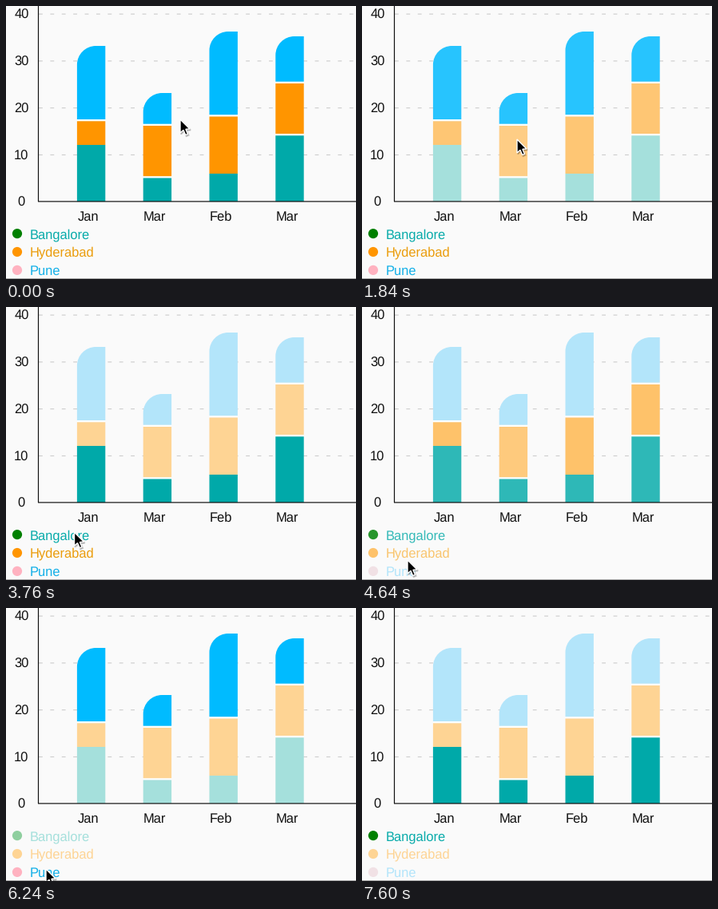
A matplotlib script for the animation above (7.68 s loop, 438 by 342 pixels).

```python
import numpy as np
import matplotlib.pyplot as plt
from matplotlib.animation import FuncAnimation
from matplotlib.colors import to_rgb
from matplotlib.patches import Circle, PathPatch, Polygon, Rectangle
from matplotlib.path import Path

W, H = 438, 342
FRAMES, STEP = 96, 80
FADE = 0.4  # seconds a highlight takes to settle

plt.rcParams["font.family"] = "Liberation Sans"
plt.rcParams["text.hinting"] = "none"
plt.rcParams["path.snap"] = False

TEAL, ORANGE, BLUE = range(3)
FULL = ["#00a9a9", "#ff9500", "#00bbff"]
PALE = ["#a5e0dc", "#fed494", "#b3e5fa"]
DOT_FULL = ["#008000", "#ff9500", "#ffb2c0"]
DOT_PALE = ["#8fcf9f", "#fed494", "#f1e1e5"]
TEXT_FULL = ["#08abaa", "#eb9d0c", "#14b0e8"]
NAMES = ["Bangalore", "Hyderabad", "Pune"]

# (month, tops of teal / orange / blue, gap above teal)
BARS = [
    ("Jan", (174, 144.3, 50), False),
    ("Mar", (215.5, 150, 109), True),
    ("Feb", (210, 138.5, 32), False),
    ("Mar", (162.3, 97, 38), True),
]
LEFT, PITCH, WIDTH = 88.9, 82.8, 35.4
BASE, GAP, RADIUS = 245, 2.3, 23.6

# (tap second, highlighted series); None lights all of them
BAR_EVENTS = [(-1, None), (0.62, BLUE), (1.72, ORANGE), (2.9, TEAL),
              (4.5, ORANGE), (5.66, BLUE), (7.02, TEAL)]
LEGEND_EVENTS = [(-1, None), (3.92, TEAL), (4.5, ORANGE), (5.66, BLUE),
                 (7.02, TEAL)]

# Pointer tip: second, x, y
TRACK = np.array([
    (0, 218, 142), (0.55, 195, 126), (1.2, 195, 126), (1.7, 194, 167),
    (2.0, 194, 167), (2.6, 193, 228), (3.1, 193, 228), (3.9, 76, 287),
    (4.1, 72, 287), (4.45, 57, 317), (5.2, 57, 317), (5.55, 50, 327),
    (6.5, 50, 327), (6.95, 56, 286),
])
POINTER_END = 7.4
ARROW = np.array([(0, 0), (0, 17), (4, 13.4), (6.7, 19.6), (9.5, 18.4),
                  (6.9, 12.3), (12, 12)])


def ease(u):
    u = min(max(u, 0), 1)
    return u * u * (3 - 2 * u)


def lit(events, series, t):
    """Highlight strength of a series, 0 to 1."""
    level = 1.0
    for start, on in events:
        goal = 1.0 if on is None else float(on == series)
        level += (goal - level) * ease((t - start) / FADE)
    return level


def mix(pale, full, u):
    a, b = np.array(to_rgb(pale)), np.array(to_rgb(full))
    return tuple(a + (b - a) * u)


def pointer_at(t):
    i = min(max(np.searchsorted(TRACK[:, 0], t, "right") - 1, 0), len(TRACK) - 2)
    a, b = TRACK[i], TRACK[i + 1]
    u = ease((t - a[0]) / (b[0] - a[0]))
    return a[1:] + (b[1:] - a[1:]) * u


fig = plt.figure(figsize=(W / 72, H / 72), dpi=72, facecolor="#fafafa")
ax = fig.add_axes([0, 0, 1, 1])
ax.set(xlim=(0, W), ylim=(H, 0))
ax.axis("off")


def line(xs, ys, color, lw, **kw):
    ax.plot(xs, ys, color=color, lw=lw, solid_capstyle="butt",
            dash_capstyle="butt", snap=False, **kw)


def label(x, y, s, ha="center", color="#111111"):
    return ax.text(x, y, s, ha=ha, va="baseline", size=16.5, color=color, zorder=4)


def block(x, top, bottom, color):
    return ax.add_patch(Rectangle((x, top), WIDTH, bottom - top, fc=color,
                                  lw=0, zorder=2, snap=False))


def rounded(x, top, bottom, color):
    k, r, x1 = 0.448 * RADIUS, RADIUS, x + WIDTH
    pts = [(x, bottom), (x, top + r), (x, top + k), (x + k, top),
           (x + r, top), (x1, top), (x1, bottom), (x, bottom)]
    codes = [Path.MOVETO, Path.LINETO] + [Path.CURVE4] * 3 + \
            [Path.LINETO] * 2 + [Path.CLOSEPOLY]
    return ax.add_patch(PathPatch(Path(pts, codes), fc=color, lw=0, zorder=2))


for i in range(5):
    y = 245.3 - 58.8 * i
    if i:
        line([41, W], [y, y], "#cfcfcf", 1.2, dashes=(4, 8), zorder=1)
    label(19.3, y + 6, str(10 * i))

segments = []
for b, (month, (t0, t1, t2), split) in enumerate(BARS):
    x = LEFT + PITCH * b
    block(x, t1 - GAP, t1, "white")
    if split:
        block(x, t0 - GAP, t0, "white")
    segments += [
        (b, TEAL, block(x, t0, BASE, FULL[TEAL])),
        (b, ORANGE, block(x, t1, t0 - GAP if split else t0, FULL[ORANGE])),
        (b, BLUE, rounded(x, t2, t1 - GAP, FULL[BLUE])),
    ]
    label(x + WIDTH / 2 - 3.6, 268.5, month)

line([40.5, 40.5], [0, 245], "#111111", 1.2, zorder=3)
line([40, W], [244.9, 244.9], "#111111", 1.2, zorder=3)
line([0, W], [341.5, 341.5], "#aaaaaa", 1, zorder=3)

legend = []
for k, name in enumerate(NAMES):
    y = 285.1 + 22.9 * k
    dot = ax.add_patch(Circle((14, y), 6.1, fc=DOT_FULL[k], lw=0, zorder=4))
    legend.append((k, dot, label(29.5, y + 5.9, name, "left", TEXT_FULL[k])))

shadow = ax.add_patch(Polygon(ARROW, fc="black", ec="black", lw=2,
                              alpha=0.2, zorder=8, snap=False))
arrow = ax.add_patch(Polygon(ARROW, fc="black", ec="white", lw=1.4,
                             joinstyle="miter", zorder=9, snap=False))


def draw(n):
    t = n * STEP / 1000
    for b, k, patch in segments:
        lag = 0.04 if (b, k) == (1, ORANGE) else 0
        patch.set_facecolor(mix(PALE[k], FULL[k], lit(BAR_EVENTS, k, t - lag)))
    for k, dot, text in legend:
        u = lit(LEGEND_EVENTS, k, t)
        dot.set_facecolor(mix(DOT_PALE[k], DOT_FULL[k], u))
        text.set_color(mix(PALE[k], TEXT_FULL[k], u))
    tip = pointer_at(t)
    arrow.set_xy(ARROW + tip)
    shadow.set_xy(ARROW + tip + (1, 1.5))
    for p in (arrow, shadow):
        p.set_visible(t < POINTER_END)
    return []


anim = FuncAnimation(fig, draw, frames=FRAMES, init_func=lambda: draw(0),
                     interval=STEP, repeat=True, repeat_delay=0, blit=False)
plt.show()
```
